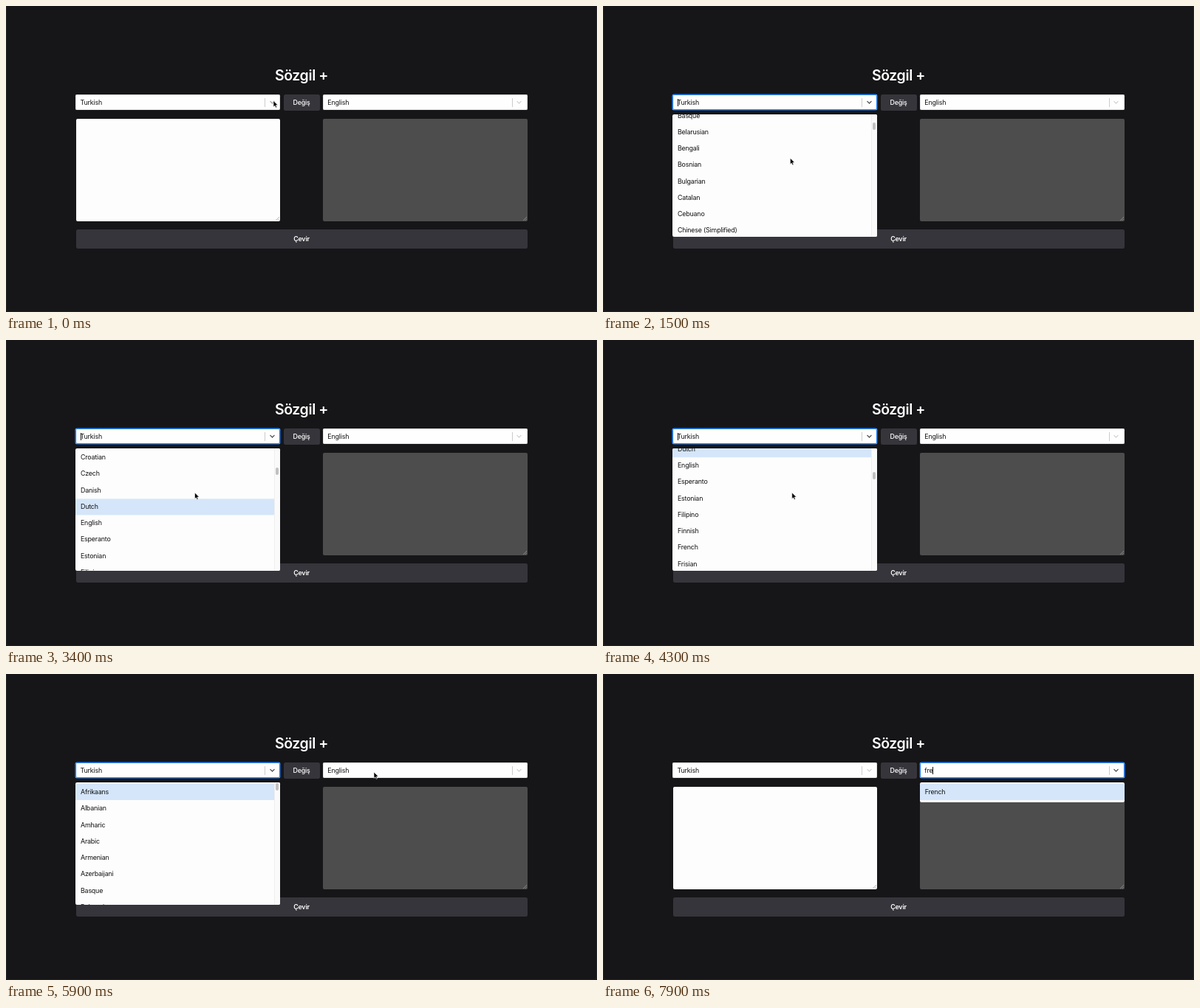
Write an HTML page that moves like this. It is 800 px wide and 415 px high and loops after 8000 ms.

```html
<!DOCTYPE html>
<html lang="tr">
<head>
<meta charset="utf-8">
<title>Sözgil +</title>
<style>
html, body { margin: 0; width: 100%; height: 100%; overflow: hidden; background: #161618; }
#stage {
  position: relative; width: 800px; height: 415px; overflow: hidden; background: #161618;
  font: 8.9px/1 Inter, Roboto, sans-serif; letter-spacing: -.022em; color: #111; cursor: none;
}
#stage * { box-sizing: border-box; }
#stage div, #stage svg { position: absolute; }
.edge { inset: 0; border: solid #232325; border-width: 0 1px 1px; border-radius: 0 0 4px 4px; }
h1 {
  position: absolute; left: 0; top: 82px; width: 800px; margin: 0; text-align: center;
  font-size: 19.5px; line-height: 24px; font-weight: 600; letter-spacing: -.02em; color: #fff;
}
.button { background: #36353b; color: #fff; border-radius: 2.5px; text-align: center; font-weight: 500; }
#swap { left: 375.5px; top: 120px; width: 49px; height: 22px; line-height: 22.6px; }
#go { left: 94.5px; top: 302.5px; width: 611px; height: 26px; line-height: 26.4px; font-weight: 600; }
.area { top: 153.3px; width: 276.5px; height: 139px; border-radius: 2px; }
.area svg { right: 1px; bottom: 1px; }
.control {
  top: 120.3px; width: 276.5px; height: 21px; border-radius: 2.2px; background: #fefefe;
  box-shadow: inset 0 0 0 .55px #ccc;
}
.control.focus { box-shadow: inset 0 0 0 1.1px #2684ff, 0 0 0 .5px #2684ff; }
.value { left: 6.3px; top: 0; line-height: 21.4px; white-space: pre; }
.caret { display: inline-block; width: .7px; height: 10px; margin-right: -.7px; background: #111; vertical-align: -2px; }
.bar { left: 255.5px; top: 4.5px; width: .7px; height: 12px; background: #ccc; }
.chevron { left: 260.4px; top: 5px; width: 11px; height: 11px; fill: none; stroke-width: 2; stroke-linecap: round; }
.menu { top: 146.8px; width: 276.5px; max-height: 166.5px; border-radius: 2.2px; background: #fdfdfd; overflow: hidden; }
#stage .list { position: relative; padding: 2.3px 0; }
#stage .row { position: relative; height: 22.25px; line-height: 22.4px; padding-left: 6.7px; white-space: pre; }
#stage [hidden] { display: none; }
.row.on { background: #d5e6fa; }
.track { right: 0; top: 0; width: 8.3px; height: 100%; background: #fafafa; box-shadow: inset .6px 0 #e6e6e6; }
.thumb { left: 2.4px; width: 4.4px; height: 10px; border-radius: 2.2px; background: #c1c1c1; }
#cursor { left: 0; top: 0; overflow: visible; }
</style>
</head>
<body>
<div id="stage">
  <div class="edge"></div>
  <h1>Sözgil +</h1>
  <div id="swap" class="button">Değiş</div>
  <div id="go" class="button">Çevir</div>
  <svg id="cursor" width="8" height="11">
    <path d="M0 0V8.4L1.9 6.7 3.1 9.4 4.6 8.8 3.4 6.1H6z" fill="#000" stroke="#fff" stroke-width=".6"/>
  </svg>
</div>
<script>
const LOOP = 8000, FRAME = 100, SCROLL_RATIO = 0.071;
const LANGUAGES = ("Afrikaans,Albanian,Amharic,Arabic,Armenian,Azerbaijani,Basque,Belarusian,Bengali,Bosnian," +
  "Bulgarian,Catalan,Cebuano,Chinese (Simplified),Chinese (Traditional),Corsican,Croatian,Czech,Danish,Dutch," +
  "English,Esperanto,Estonian,Filipino,Finnish,French,Frisian,Galician,Georgian,German,Greek,Gujarati," +
  "Haitian Creole,Hausa,Hawaiian,Hebrew,Hindi").split(",");

const stage = document.getElementById("stage");
const cursor = document.getElementById("cursor");

function add(parent, className, text = "", tag = "div") {
  const el = document.createElement(tag);
  el.className = className;
  el.textContent = text;
  return parent.appendChild(el);
}

function addArea(left, color, grip) {
  const area = add(stage, "area");
  area.style.cssText = `left:${left}px;background:${color}`;
  area.innerHTML = `<svg width="5" height="5"><path d="M0 5 5 0M2.5 5 5 2.5" stroke="${grip}" stroke-width=".6"/></svg>`;
}

function addSelect(left, language) {
  const control = add(stage, "control");
  const value = add(control, "value");
  const typed = add(value, "", "", "span");
  const caret = add(value, "caret", "", "span");
  const label = add(value, "", language, "span");
  add(control, "bar");
  control.insertAdjacentHTML("beforeend",
    '<svg class="chevron" viewBox="0 0 20 20"><path d="M5.2 8 10 12.8 14.8 8"/></svg>');
  const chevron = control.lastChild;
  const menu = add(stage, "menu");
  const list = add(menu, "list");
  const rows = LANGUAGES.map(name => add(list, "row", name));
  const track = add(menu, "track");
  const thumb = add(track, "thumb");
  control.style.left = menu.style.left = left + "px";

  return ({ open, query = "", scroll, active, blink, idle = "#ccc" }) => {
    control.classList.toggle("focus", open);
    chevron.style.stroke = open ? "#333" : idle;
    menu.hidden = !open;
    typed.textContent = query;
    label.hidden = query !== "";
    caret.style.visibility = open && blink ? "visible" : "hidden";
    const matches = rows.filter(row => row.textContent.toLowerCase().includes(query));
    rows.forEach(row => {
      row.hidden = !matches.includes(row);
      row.classList.toggle("on", row === matches[active]);
    });
    list.style.transform = `translateY(${-scroll}px)`;
    track.hidden = query !== "";
    thumb.style.top = 1 + scroll * SCROLL_RATIO + "px";
  };
}

// Linear interpolation through [time, value] keys.
function tween(keys, t, part = 1) {
  const next = keys.findIndex(key => key[0] > t);
  if (next === 0) return keys[0][part];
  if (next < 0) return keys[keys.length - 1][part];
  const a = keys[next - 1], b = keys[next];
  return a[part] + (b[part] - a[part]) * (t - a[0]) / (b[0] - a[0]);
}

// Latest value of [time, value] keys, with hard changes.
function step(keys, t) {
  return keys.reduce((value, key) => t >= key[0] ? key[1] : value, keys[0][1]);
}

const blinkSince = (start, t) => Math.floor((t - start) / 500) % 2 === 0;

const pointer = [
  [0, 362, 128.5], [300, 361, 131], [700, 256, 203], [800, 252, 206], [2300, 255, 206.5],
  [3400, 255.5, 207], [5100, 256, 207], [5200, 258, 204], [5400, 290, 165], [5600, 380, 140],
  [5900, 498, 133], [6000, 500, 133], [6100, 503, 140], [6300, 512, 165], [6600, 520, 185], [6900, 522, 187]
];
const leftScroll = [
  [700, 0], [800, 1], [1000, 20], [1500, 145], [2000, 260], [2300, 311], [2700, 378], [3000, 378],
  [3400, 356.6], [3600, 372], [4100, 437], [4200, 437], [4300, 434.8], [4700, 180], [5100, 0]
];
const leftActive = [[300, 0], [600, 1], [700, 2], [2800, 19], [5200, 2], [5300, 1], [5400, 0]];
const rightScroll = [[6900, 0], [7300, 120]];
const typing = [[0, ""], [7600, "f"], [7700, "fr"], [7850, "fre"]];

addArea(94.5, "#fdfdfd", "#888");
addArea(429, "#4d4d4d", "#aaa");
const drawLeft = addSelect(94.3, "Turkish");
const drawRight = addSelect(429, "English");
stage.append(cursor);

function draw() {
  const t = Math.floor(performance.now() % LOOP / FRAME) * FRAME;
  const query = step(typing, t);
  drawLeft({
    open: t >= 300 && t < 6000,
    scroll: tween(leftScroll, t),
    active: step(leftActive, t),
    blink: blinkSince(300, t),
    idle: t < 300 ? "#999" : "#ccc"
  });
  drawRight({
    open: t >= 6000,
    query,
    scroll: query ? 0 : tween(rightScroll, t),
    active: query || t < 6400 ? 0 : 1,
    blink: query !== "" || blinkSince(6100, t)
  });
  cursor.style.transform = `translate(${tween(pointer, t)}px, ${tween(pointer, t, 2)}px)`;
  cursor.style.visibility = query ? "hidden" : "visible";
  requestAnimationFrame(draw);
}
draw();
</script>
</body>
</html>
```
